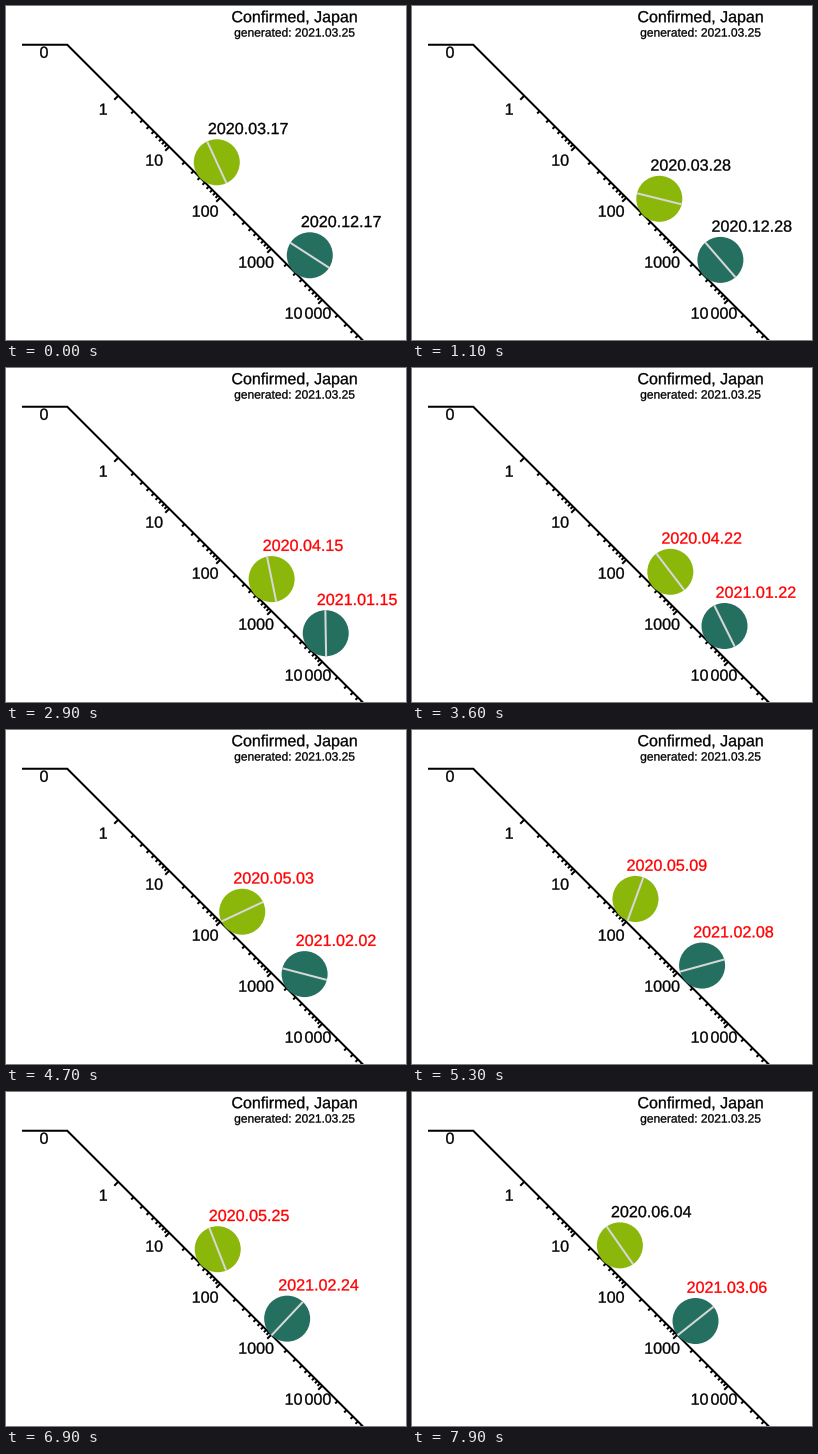
These frames come from a looping animation (400x334 px, 8000 ms). A matplotlib script:

```python
import matplotlib.pyplot as plt
import numpy as np
from matplotlib.animation import FuncAnimation
from matplotlib.patches import Circle
from matplotlib.patheffects import Stroke

W, H, DPI = 400, 334, 100
PX = 72 / DPI
FRAMES, INTERVAL = 80, 100

X0, Y0, DECADE = 61.25, 38.75, 51  # corner of the slope and its log step
RADIUS, LEAN = 23, 16              # LEAN: ball centre from its contact point

plt.rcParams["font.family"] = "Liberation Sans"

fig = plt.figure(figsize=(W / DPI, H / DPI), dpi=DPI, facecolor="white")
ax = fig.add_axes([0, 0, 1, 1])
ax.set_xlim(0, W)
ax.set_ylim(H, 0)
ax.axis("off")


def stroke(xs, ys, color="black", z=1):
    return ax.plot(xs, ys, color=color, lw=2 * PX, zorder=z, snap=False,
                   solid_capstyle="butt", solid_joinstyle="miter")[0]


def write(x, y, text, size=16.1, ha="center"):
    return ax.text(x, y, text, fontsize=size * PX, ha=ha, va="baseline", zorder=5,
                   path_effects=[Stroke(linewidth=0.3 * PX)])


def slope_x(log_cases):
    return X0 + DECADE * (1 + log_cases)


def tick(cases, length):
    x = slope_x(np.log10(cases))
    y = x - X0 + Y0
    stroke([x, x - length], [y, y + length])


def draw_scale():
    stroke([16, X0, X0 + 310], [Y0, Y0, Y0 + 310])
    write(38, 51.8, "0")
    for power in range(5):
        unit = 10 ** power
        tick(unit, 4)
        for k in range(2, 10):
            tick(k * unit, 2.4)
        x, y = 97.2 + DECADE * power, 108.7 + DECADE * power
        if power < 4:
            write(x, y, str(unit))
        else:
            write(x - 4.6, y, "10", ha="right")
            write(x - 2.7, y, "000", ha="left")


def smooth(t, ts, ys):
    """Cubic Hermite curve through a few key points."""
    i = min(np.searchsorted(ts, t, side="right"), len(ts) - 1) - 1
    h = ts[i + 1] - ts[i]
    u = (t - ts[i]) / h
    m = np.gradient(ys, ts) * h
    rise = u * u * (3 - 2 * u)
    bend = u * (1 - u) * (m[i] * (1 - u) - m[i + 1] * u)
    return ys[i] + (ys[i + 1] - ys[i]) * rise + bend


class Ball:
    """A disc that rolls along the slope, one day per frame."""

    def __init__(self, color, start, alert, keys):
        self.start = np.datetime64(start)
        self.alert = [np.datetime64(d) for d in alert]
        self.days, cases = np.array(keys, float).T
        self.logs = np.log10(cases)
        self.disc = ax.add_patch(Circle((0, 0), RADIUS, fc=color, lw=0, zorder=3))
        self.stripe = stroke([], [], "#d8d8d8", 4)
        self.label = write(0, 0, "", ha="left")

    def update(self, day):
        cx = slope_x(smooth(day, self.days, self.logs)) + LEAN
        cy = cx - X0 + Y0 - 2 * LEAN
        turn = np.radians(66) + (cx - 211) * np.sqrt(2) / RADIUS
        dx, dy = RADIUS * np.cos(turn), RADIUS * np.sin(turn)
        self.disc.center = cx, cy
        self.stripe.set_data([cx - dx, cx + dx], [cy - dy, cy + dy])

        date = self.start + day
        first, last = self.alert
        self.label.set_text(str(date).replace("-", "."))
        self.label.set_color("red" if first <= date <= last else "black")
        self.label.set_position((cx - 8.9, cy - 28.2))


draw_scale()
write(288.5, 16.2, "Confirmed, Japan", 16)
write(289, 30.6, "generated: 2021.03.25", 12)

# Key points: (day, daily cases)
balls = [
    Ball("#8bb60a", "2020-03-17", ("2020-04-07", "2020-05-25"),
         [(0, 41.5), (6, 105), (11, 216), (21, 546), (28, 508), (36, 355),
          (47, 131), (54, 67), (62, 32), (71, 46), (79, 36.4)]),
    Ball("#256f61", "2020-12-17", ("2021-01-07", "2021-03-21"),
         [(0, 2765), (8, 3550), (11, 3406), (18, 6220), (21, 6400), (27, 6030),
          (36, 4100), (47, 2190), (53, 1490), (60, 1270), (68, 1005), (79, 1108)]),
]


def draw(day):
    for ball in balls:
        ball.update(day)


anim = FuncAnimation(fig, draw, frames=FRAMES, interval=INTERVAL,
                     repeat=True, repeat_delay=0, blit=False)
plt.show()
```
